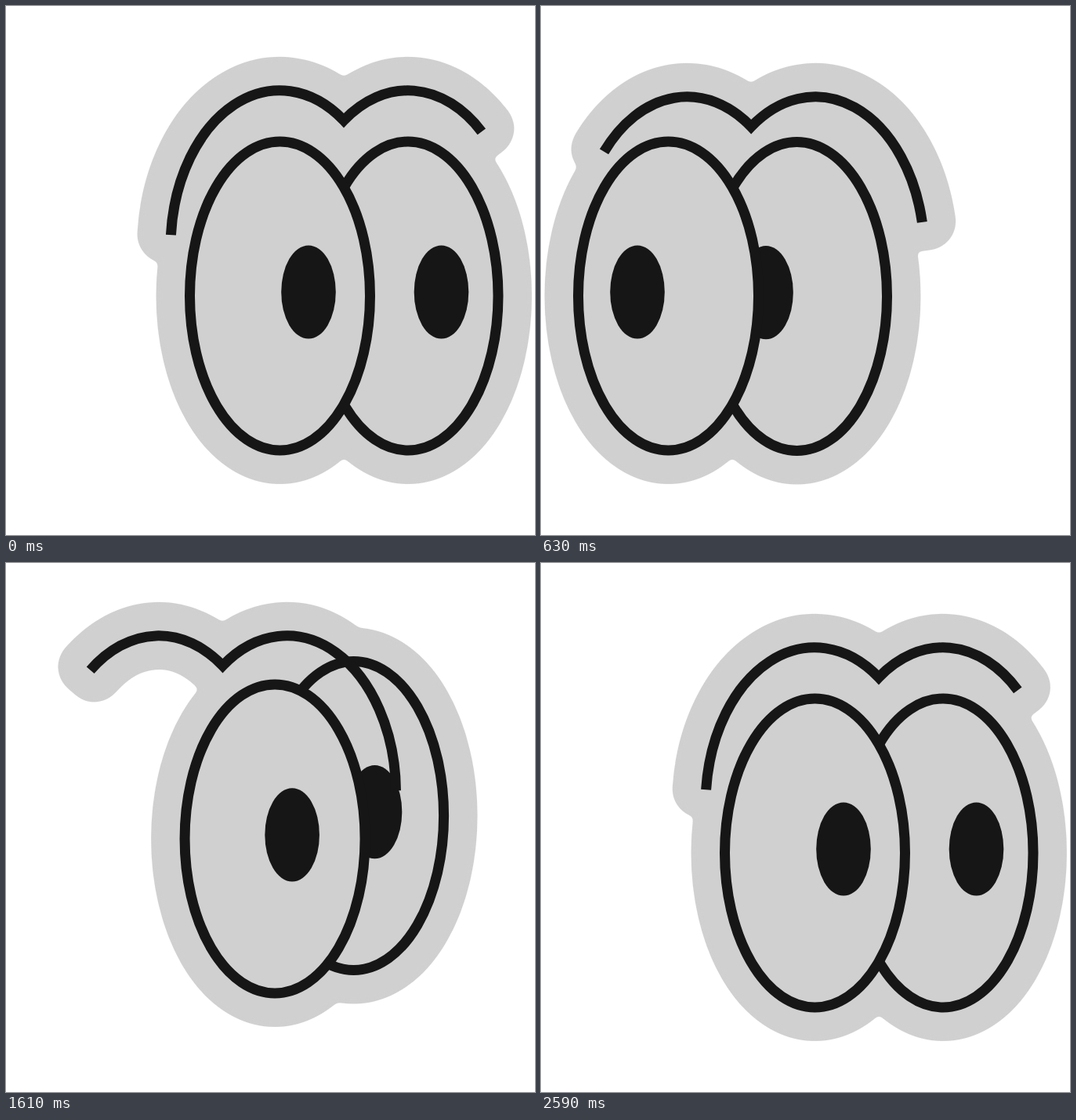
Write an HTML page that moves like this. It is 675 px wide and 675 px high and loops after 2.66 s.

```html
<!DOCTYPE html>
<html lang="en">
<head>
<meta charset="utf-8">
<title>Looking eyes</title>
<style>
  html, body { margin: 0; height: 100%; overflow: hidden; background: #fff; }
  svg { display: block; width: 675px; height: 675px; }
  .line { fill: none; stroke: #161616; stroke-width: 13; }
  .pupil { fill: #161616; }
  .halo { fill: #d0d0d0; stroke: #d0d0d0; stroke-width: 86; stroke-linejoin: round; }
  .halo .brow { fill: none; }
  .halo .caps { stroke-width: 73; stroke-linecap: round; }
</style>
</head>
<body>
<svg viewBox="0 0 675 675">
  <defs>
    <ellipse id="eye" rx="115" ry="197"/>
    <ellipse id="pupil" rx="34.8" ry="59.6"/>
    <!-- rounds off the inner corners of the halo -->
    <filter id="soften" filterUnits="userSpaceOnUse" x="-20" y="-20" width="715" height="715" color-interpolation-filters="sRGB">
      <feGaussianBlur stdDeviation="3"/>
      <feComponentTransfer><feFuncA type="linear" slope="8" intercept="-3.5"/></feComponentTransfer>
    </filter>
  </defs>
  <g class="halo" filter="url(#soften)">
    <use href="#eye" class="right"/>
    <use href="#eye" class="left"/>
    <path class="brow"/>
    <path class="caps"/>
  </g>
  <g class="right">
    <use href="#eye" class="line"/>
    <use href="#pupil" class="pupil"/>
  </g>
  <g class="left">
    <use href="#eye" class="line" style="fill:#d0d0d0"/>
    <use href="#pupil" class="pupil"/>
  </g>
  <path class="brow line"/>
</svg>
<script>
const LOOP = 2660, STEP = 70, MOVE = 500;
const ARC = { rx: 139.2, ry: 200, peak: 81.8, rise: 38.2 };

// Angle of the brow's right end over time; the left end takes the rest of the span.
const BROW_SPAN = 128;
const BROW_KEYS = [[0, 42.5], [385, 41.6], [560, 72], [630, 78.5], [770, 83], [1050, 86.8],
  [1610, 89.3], [1680, 88], [1890, 59], [2030, 54], [2240, 49.6], [2450, 45], [2660, 42.5]];

const setAll = (selector, name, value) =>
  document.querySelectorAll(selector).forEach(el => el.setAttribute(name, value));

const bezier = (v, p1, p2) => 3 * v * (1 - v) ** 2 * p1 + 3 * v * v * (1 - v) * p2 + v ** 3;

function ease(ms) {
  const x = Math.min(1, Math.max(0, ms / MOVE));
  let low = 0, high = 1;
  for (let i = 0; i < 24; i++) {
    const mid = (low + high) / 2;
    if (bezier(mid, .33, .1) < x) low = mid; else high = mid;
  }
  return bezier(low, 0, 1);
}

// 0 when looking right, 1 when looking left
const swing = (t, goLeft, goRight) => ease(t - goLeft) - ease(t - goRight);

// Travels left on a curve below the rest line, and back on one above it.
function place(t, x, y, distance, goLeft, goRight) {
  const s = swing(t, goLeft, goRight);
  const dip = t < 1300 ? 51 : -47.5;
  return [x - distance * bezier(s, .05, .67), y + dip * 4 * s * (1 - s)];
}

function keyed(keys, t) {
  const i = keys.findIndex(key => key[0] > t);
  const [t0, a] = keys[i - 1], [t1, b] = keys[i];
  return a + (b - a) * (t - t0) / (t1 - t0);
}

// Tip of one brow arc, relative to the notch, with the ends of its square cut.
function browTip(degrees, side) {
  const angle = degrees * Math.PI / 180, sin = Math.sin(angle), cos = Math.cos(angle);
  const x = side * (ARC.peak + ARC.rx * sin), y = ARC.ry * (1 - cos) - ARC.rise;
  const nx = side * sin / ARC.rx, ny = -cos / ARC.ry, k = 6.5 / Math.hypot(nx, ny);
  return { point: `${x} ${y}`, cut: `M${x - nx * k} ${y - ny * k}L${x + nx * k} ${y + ny * k}` };
}

function draw(t) {
  const look = swing(t, 112, 1373);
  const eyes = [
    ['left', place(t, 349.5, 370, 187, 35, 1321), 36.5 - 76 * look],
    ['right', place(t, 513, 370, 187, 170, 1463), 42.5 - 82 * look]
  ];
  for (const [name, position, pupilX] of eyes) {
    setAll('.' + name, 'transform', `translate(${position})`);
    setAll(`.${name} .pupil`, 'transform', `translate(${pupilX} -5)`);
  }

  const turn = keyed(BROW_KEYS, t);
  const start = browTip(BROW_SPAN - turn, -1), end = browTip(turn, 1);
  const arc = `A${ARC.rx} ${ARC.ry} 0 0 1 `;
  setAll('.brow', 'd', `M${start.point}${arc}0 0${arc}${end.point}`);
  setAll('.caps', 'd', start.cut + end.cut);
  setAll('.brow, .caps', 'transform', `translate(${place(t, 431, 146, 170, 271, 1543)})`);
}

function tick() {
  draw(Math.floor(performance.now() % LOOP / STEP) * STEP);
  requestAnimationFrame(tick);
}
tick();
</script>
</body>
</html>
```
